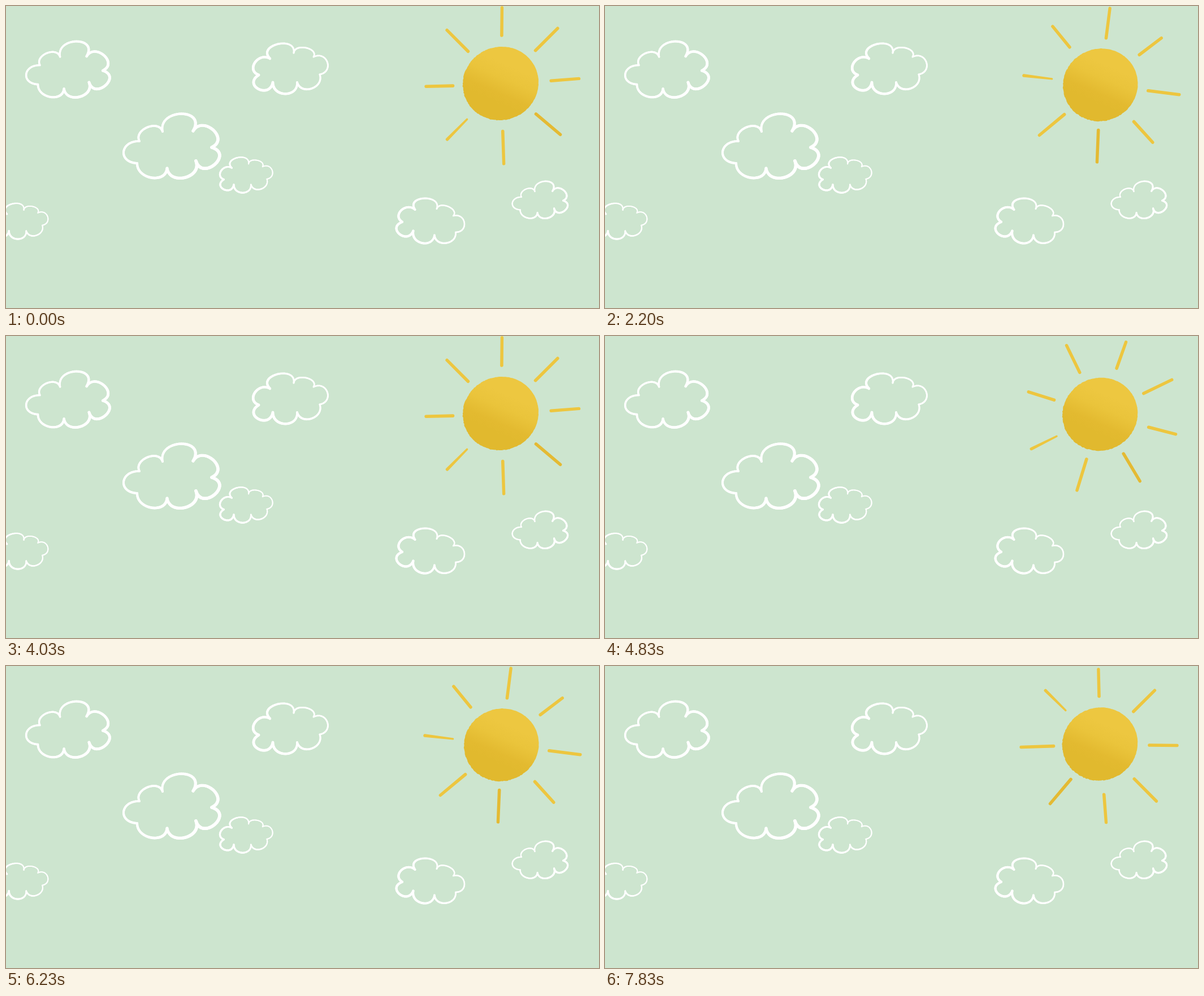
Write an HTML page with a canvas that moves like this. It is 1049x534 px and loops after 8010 ms.

```html
<!DOCTYPE html>
<html lang="en">
<head>
<meta charset="utf-8">
<title>Sunny sky</title>
<style>
  html, body { margin: 0; width: 100%; height: 100%; overflow: hidden; background: #cde5cf; }
  canvas { display: block; }
</style>
</head>
<body>
<canvas id="sky" width="1049" height="534"></canvas>
<script>
const ctx = document.getElementById('sky').getContext('2d');
const LOOP = 8010, TURN = 4030, STEP = 200, LAST = 19;
const RAD = Math.PI / 180;

// Each lobe: cusp x, y, handle height, overhang at its start and at its end.
// The pen is heaviest towards the angle "heavy".
const LONG = {
  mid: [293.5, 248], pen: 4.7, swell: 0.9, heavy: 0.5,
  lobes: [
    [236, 239, 23, 2, 2], [277, 222, 41, 8, 25], [331, 221, 33, 6, 14], [364, 250, 35, 22, 15],
    [336, 274, 31.5, 4, 3], [285, 287, 28, 2, -4], [232, 278, 34.5, 2, -3]
  ]
};
const ROUND = {
  mid: [501.4, 107.2], pen: 3.7, swell: 1, heavy: 2.6,
  lobes: [
    [467, 93, 29, 18, 12], [509, 83, 17.5, 2, 6], [544, 90, 26.5, 3, 4], [555, 121, 25, 0, 1],
    [515, 135, 27, 2, 0], [472, 135, 29.6, 9, 17], [447, 122, 24, 6, -2]
  ]
};

// shape, centre x, centre y, scale, tilt
const CLOUDS = [
  [LONG, 110, 112.5, 0.87, 0],
  [LONG, 293.5, 248, 1, 0],
  [LONG, 945, 343, 0.577, 0],
  [ROUND, 501.4, 107.2, 1, 0],
  [ROUND, 423.7, 296.3, 0.705, 0],
  [ROUND, 26.1, 378, 0.71, 0],
  [ROUND, 751, 378.5, 0.89, 0.2]
];

// Hand-drawn rays, clockwise from the top: nudge in degrees, inner and outer radius
const HUB = [876, 139];
const RAYS = [
  [1, 87, 136], [0.5, 85.5, 141], [-4, 88.5, 138], [-4.4, 80.5, 137],
  [-1.5, 82.5, 140], [0, 86, 136], [-1, 85.5, 133], [0.5, 83, 136]
];

function drawCloud([{ mid, pen, swell, heavy, lobes }, cx, cy, scale, tilt]) {
  const parts = 28;
  ctx.save();
  ctx.translate(cx, cy);
  ctx.rotate(tilt);
  ctx.scale(scale, scale);
  ctx.translate(-mid[0], -mid[1]);
  ctx.strokeStyle = '#fff';
  ctx.lineCap = 'round';
  lobes.forEach(([x0, y0, high, back, ahead], i) => {
    const [x1, y1] = lobes[(i + 1) % lobes.length];
    const len = Math.hypot(x1 - x0, y1 - y0);
    const tx = (x1 - x0) / len, ty = (y1 - y0) / len;
    const at = k => {
      const m = 1 - k, b = 3 * m * m * k, c = 3 * m * k * k;
      const along = -b * back + c * (len + ahead) + k * k * k * len;
      const out = (b + c) * high;
      return [x0 + tx * along + ty * out, y0 + ty * along - tx * out];
    };
    let [px, py] = at(0);
    for (let j = 1; j <= parts; j++) {
      const [x, y] = at(j / parts);
      ctx.lineWidth = pen + swell * Math.cos(Math.atan2(y - mid[1], x - mid[0]) - heavy);
      ctx.beginPath();
      ctx.moveTo(px, py);
      ctx.lineTo(x, y);
      ctx.stroke();
      [px, py] = [x, y];
    }
  });
  ctx.restore();
}

// A slightly squashed disc that drifts a little and has a rough lower left edge
function drawDisc(step) {
  const drift = Math.sin(Math.PI * step / 22);
  const cx = 875 + 1.3 * drift, cy = 137 + 2.5 * drift, size = 66 - 0.8 * drift;
  let seed = 7 + step * 31;
  const rand = () => (seed = (seed * 16807) % 2147483647) / 2147483647;

  ctx.beginPath();
  for (let deg = 0; deg < 360; deg += 2) {
    const a = deg * RAD;
    const rough = 0.8 + 0.5 * Math.cos(a - 2.4);
    const r = size + Math.cos(2 * a) - Math.sin(2 * a) + (rand() - 0.5) * rough;
    ctx.lineTo(cx + r * Math.cos(a), cy + r * Math.sin(a));
  }
  ctx.closePath();
  const shade = ctx.createLinearGradient(892, 106, 864, 170);
  shade.addColorStop(0, '#edc740');
  shade.addColorStop(0.35, '#eac43b');
  shade.addColorStop(0.75, '#e3ba30');
  shade.addColorStop(1, '#e1b92e');
  ctx.fillStyle = shade;
  ctx.fill();
}

function drawRays(step) {
  const turn = 4.74 * step - 0.4;
  RAYS.forEach(([nudge, near, far], i) => {
    const tip = i === 5 ? 1.7 : 2.8;
    ctx.save();
    ctx.translate(HUB[0], HUB[1]);
    ctx.rotate((45 * i - 90 + nudge + turn) * RAD);
    ctx.fillStyle = i === 3 ? '#e4ba33' : '#edc63f';
    ctx.beginPath();
    ctx.arc(near, 0, tip, Math.PI / 2, -Math.PI / 2);
    ctx.arc(far, 0, 2.7, -Math.PI / 2, Math.PI / 2);
    ctx.fill();
    ctx.restore();
  });
}

function draw(step) {
  ctx.fillStyle = '#cde5cf';
  ctx.fillRect(0, 0, 1049, 534);
  CLOUDS.forEach(drawCloud);
  drawDisc(step);
  drawRays(step);
}

let start = null, shown = -1;
function tick(now) {
  if (start === null) start = now;
  const t = (now - start) % LOOP;
  const step = Math.min(LAST, Math.floor((t < TURN ? t : t - TURN) / STEP));
  if (step !== shown) draw(shown = step);
  requestAnimationFrame(tick);
}
draw(0);
requestAnimationFrame(tick);
</script>
</body>
</html>
```
